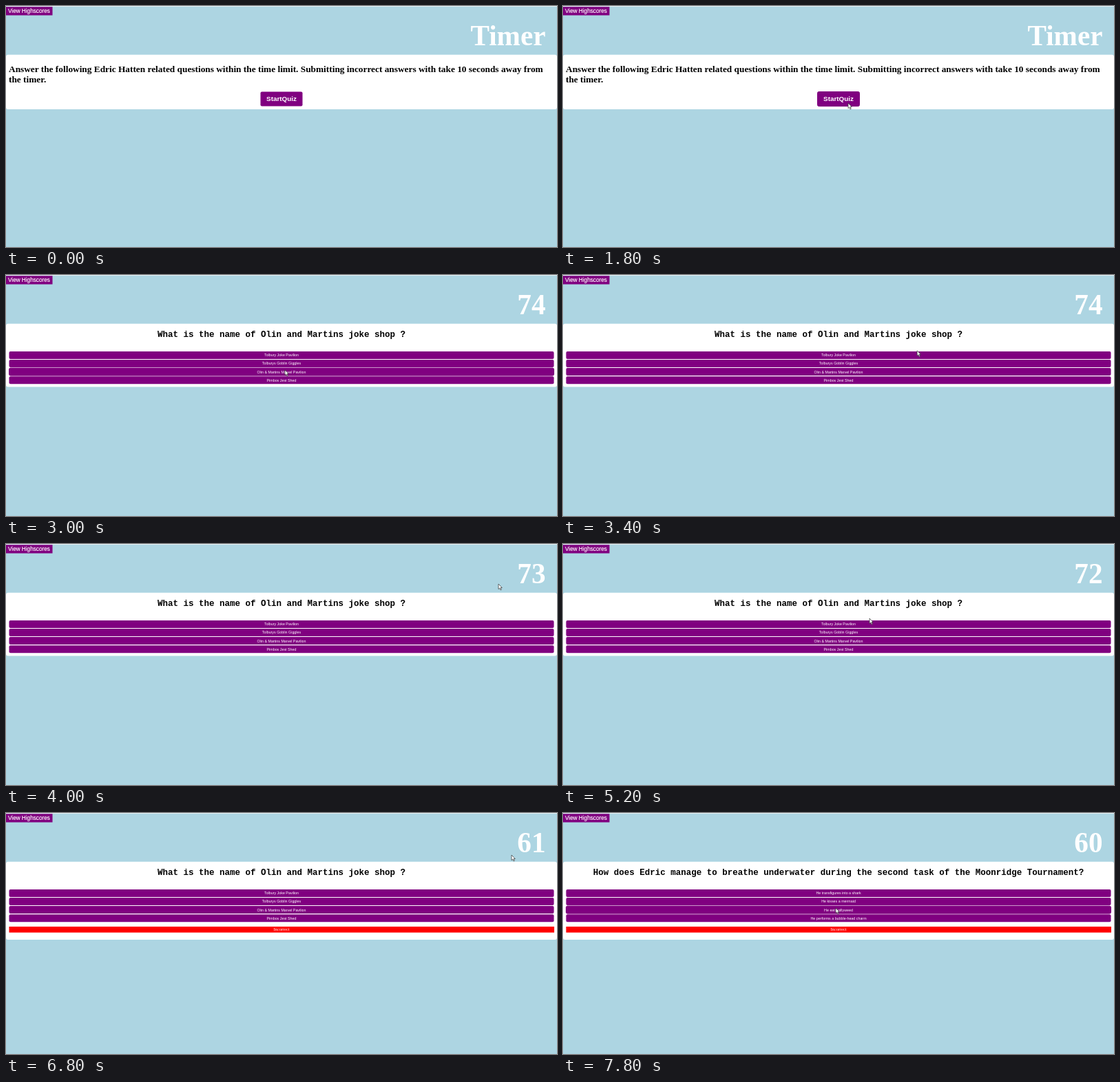
These frames come from a looping animation (800x350 px, 8000 ms). An HTML page:

```html
<!DOCTYPE html>
<html lang="en">
<head>
<meta charset="utf-8">
<title>Quiz</title>
<style>
  html, body { margin: 0; width: 100%; height: 100%; overflow: hidden; background: #add5e2; }
  svg { display: block; width: 100%; height: 100%; }
  text { fill: #fff; font-family: "Liberation Sans", Arial, sans-serif; }
  .serif { font-family: "Liberation Serif", Times, serif; }
  .bold { font-weight: bold; }
  .mid { text-anchor: middle; }
  .dark { fill: #000; }
  .button { fill: #800080; }
  .button.hover { stroke: #800080; stroke-width: 1; }
  #scores { font-size: 8.2px; stroke: #fff; stroke-width: .15px; }
  #timer { font-size: 41.2px; text-anchor: end; }
  #intro text.serif { font-size: 13.34px; }
  #question { font: bold 12.5px "Liberation Mono", "Courier New", monospace; white-space: pre; }
  .answer { font-size: 5.34px; }
</style>
</head>
<body>
<svg viewBox="0 0 800 350" preserveAspectRatio="none">
  <rect width="800" height="350" fill="#add5e2"/>
  <rect width="800" height="1" fill="#e9f2f5"/>
  <rect class="button" y="1.2" width="67.5" height="12.3"/>
  <text id="scores" x="3" y="10.1">View Highscores</text>
  <text id="timer" class="serif bold" x="783.5" y="56.7"></text>
  <rect id="card" y="70.8" width="800" rx="3" fill="#fff"/>

  <g id="intro">
    <text class="serif bold dark" x="4" y="96.2">Answer the following Edric Hatten related questions within the time limit. Submitting incorrect answers with take 10 seconds away from</text>
    <text class="serif bold dark" x="4" y="111.4">the timer.</text>
    <rect id="start" class="button" x="369.5" y="124.5" width="61" height="21" rx="2"/>
    <text class="bold mid" x="400" y="138.3" font-size="9.9">StartQuiz</text>
  </g>

  <g id="quiz">
    <text id="question" class="mid dark" x="400" y="90.3"></text>
    <g id="answers"></g>
  </g>

  <g id="wrong">
    <rect x="4.5" y="165" width="791.5" height="8.6" fill="#f00"/>
    <text class="serif mid" x="400" y="171.3" font-size="6.4">Incorrect</text>
  </g>

  <path id="cursor" d="M0 0V7.6L1.7 6 3 8.9 4.3 8.3 3 5.5H5.3Z" fill="#fff" stroke="#333" stroke-width=".7"/>
</svg>
<script>
const LOOP = 8000, STEP = 200, SECOND = 1000;
const CURSOR_AT = 200, QUIZ_AT = 2000, WRONG_AT = 6000, NEXT_AT = WRONG_AT + SECOND;
const TIME_LIMIT = 75, PENALTY = 10;

const questions = [
  ["What is the name of Olin and Martins joke shop ?",
    "Tolbury Joke Pavilion", "Tolburys Goblin Giggles",
    "Olin & Martins Marvel Pavilion", "Pimbos Jest Shed"],
  ["How does Edric manage to breathe underwater during the second task of the Moonridge Tournament?",
    "He transfigures into a shark", "He kisses a mermaid",
    "He eats gillyweed", "He performs a bubble-head charm"],
];

// The places where the cursor turns or rests.
const stops = [
  { at: CURSOR_AT, x: 60, y: 96 },
  { at: 800, x: 483, y: 104 },
  { at: 1800, x: 414, y: 141 },
  { at: 3000, x: 405, y: 138 },
  { at: 4000, x: 715, y: 58 },
  { at: 4400, x: 792, y: 12 },
  { at: 5200, x: 445, y: 108 },
  { at: WRONG_AT, x: 415, y: 115 },
  { at: 6800, x: 734, y: 61 },
  { at: 7200, x: 720, y: 4 },
  { at: 7800, x: 396, y: 138 },
];

const $ = id => document.getElementById(id);
const show = (id, on) => $(id).style.display = on ? "" : "none";
const smooth = k => k * k * (3 - 2 * k);
const mix = (a, b, k) => a + (b - a) * k;

function add(parent, tag, attrs) {
  const el = document.createElementNS("http://www.w3.org/2000/svg", tag);
  for (const name in attrs) el.setAttribute(name, attrs[name]);
  return parent.appendChild(el);
}

const rows = questions[0].slice(1).map((_, i) => {
  const y = 111 + i * 12.05;
  return {
    y,
    box: add($("answers"), "rect", { class: "button", x: 4.5, y, width: 791, height: 11, rx: 2 }),
    label: add($("answers"), "text", { class: "answer mid", x: 400, y: y + 7.4 }),
  };
});

function cursorAt(t) {
  const to = stops.find(s => s.at > t) || stops[stops.length - 1];
  const from = stops[Math.max(0, stops.indexOf(to) - 1)];
  const k = from === to ? 0 : smooth(Math.min(1, (t - from.at) / (to.at - from.at)));
  return [mix(from.x, to.x, k), mix(from.y, to.y, k)];
}

function timerAt(t) {
  const seconds = Math.floor((t - QUIZ_AT) / SECOND);
  return seconds < 1 ? "Timer" : TIME_LIMIT - seconds - (t >= WRONG_AT ? PENALTY : 0);
}

function draw(t) {
  const quiz = t >= QUIZ_AT, wrong = t >= WRONG_AT;
  const [x, y] = cursorAt(t);

  $("timer").textContent = timerAt(t);
  $("card").setAttribute("height", wrong ? 113.3 : quiz ? 91.7 : 79.2);
  show("intro", !quiz);
  show("quiz", quiz);
  show("wrong", wrong);
  show("cursor", t >= CURSOR_AT);
  $("cursor").setAttribute("transform", `translate(${x} ${y})`);
  $("start").classList.toggle("hover", x > 369 && x < 431 && y > 124 && y < 146);

  const [title, ...answers] = questions[t >= NEXT_AT ? 1 : 0];
  $("question").textContent = title;
  rows.forEach((row, i) => {
    row.label.textContent = answers[i];
    row.box.classList.toggle("hover", y >= row.y && y < row.y + 11);
  });
}

const start = performance.now();
let last = -1;
function tick() {
  const elapsed = Math.max(0, performance.now() - start) % LOOP;
  const t = Math.floor(elapsed / STEP) * STEP;
  if (t !== last) draw(last = t);
  requestAnimationFrame(tick);
}
tick();
</script>
</body>
</html>
```
